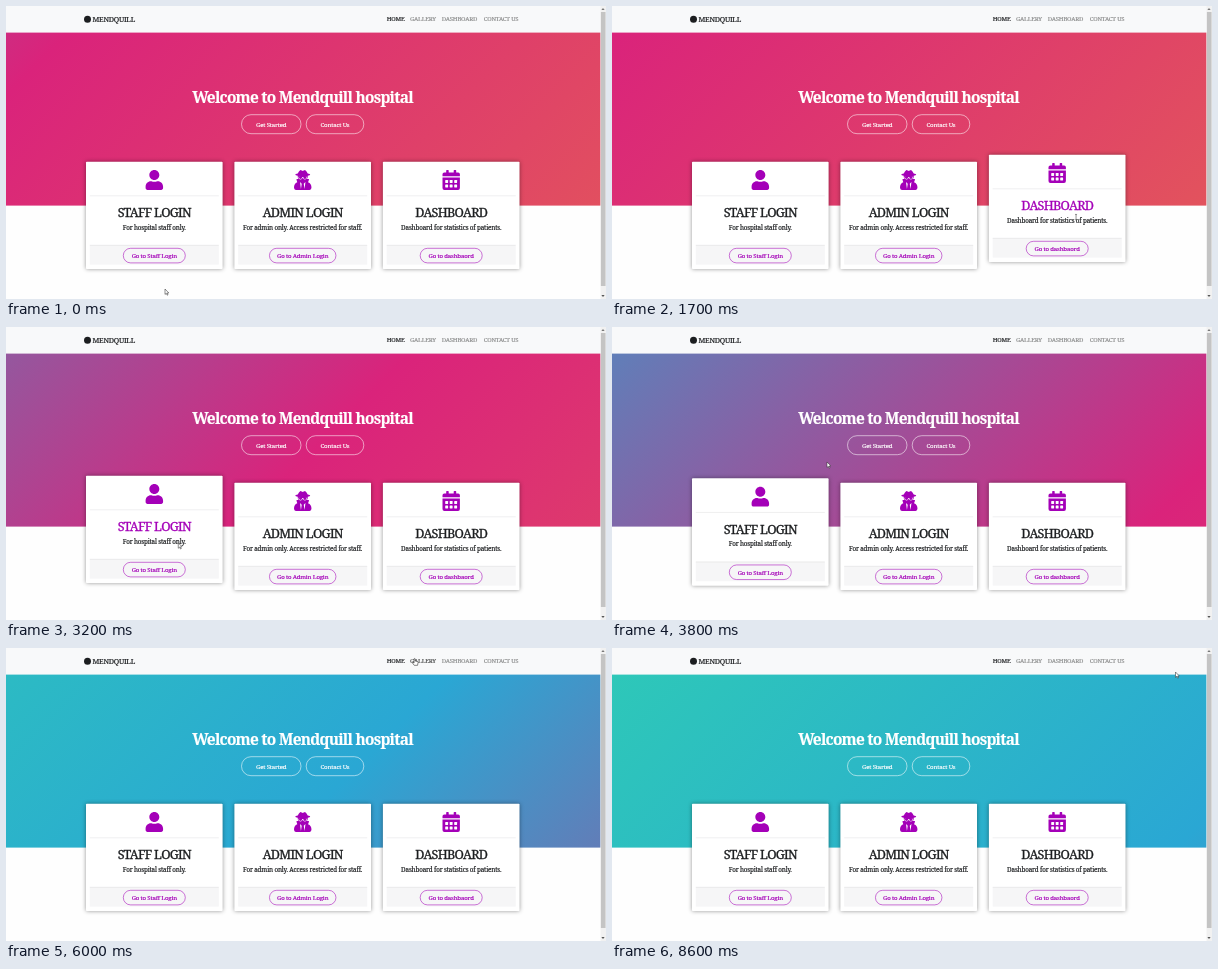
Write an HTML page that moves like this. It is 600 by 293 pixels and loops after 8.7 s.

```html
<!DOCTYPE html>
<html lang="en">
<head>
<meta charset="utf-8">
<title>Hospital home</title>
<style>
html, body { margin: 0; width: 100%; height: 100%; overflow: hidden; background: #fff; }
svg { display: block; width: 100vw; height: 100vh; }
text {
  font-family: "Noto Serif", serif; color: #1c1e20;
  fill: currentColor; stroke: currentColor; stroke-width: .18px;
}
.mid { text-anchor: middle; }
.brand { font-size: 7.3px; letter-spacing: -.25px; }
.link { font-size: 6px; letter-spacing: -.2px; color: #8c8d8d; }
.hero { font-size: 15.4px; font-weight: 700; letter-spacing: -.75px; color: #fff; }
.pill { font-size: 6.1px; letter-spacing: -.17px; }
.title { font-size: 12.6px; letter-spacing: -.7px; stroke-width: .3px; }
.note { font-size: 6.3px; letter-spacing: -.15px; }
.card { filter: drop-shadow(0 .5px 2px rgba(0, 0, 0, .42)); }
.icon { fill: #a400b8; }
</style>
</head>
<body>
<svg id="stage" viewBox="0 0 600 293" preserveAspectRatio="none">
  <defs>
    <linearGradient id="sky" gradientUnits="userSpaceOnUse" x1="1954" y1="1110" x2="422" y2="-422">
      <stop offset="0" stop-color="#e56353"/>
      <stop offset=".3333" stop-color="#da237b"/>
      <stop offset=".6667" stop-color="#2aa7d4"/>
      <stop offset="1" stop-color="#2fd4ae"/>
    </linearGradient>
  </defs>
  <rect width="600" height="293" fill="#fefefe"/>
  <rect width="595" height="27" fill="#f8f9fa"/>
  <rect y="26.6" width="594.6" height="173" fill="url(#sky)"/>
  <circle cx="81.5" cy="13.3" r="3.5" fill="#1c1e20"/>
  <text class="brand" x="86.5" y="16">MENDQUILL</text>
  <g id="nav"></g>
  <text class="hero mid" x="296.5" y="96.6">Welcome to Mendquill hospital</text>
  <g id="calls"></g>
  <g id="cards"></g>
  <rect x="594.6" width="5.4" height="293" fill="#f1f1f1"/>
  <rect x="594.9" y="6" width="4.6" height="274" fill="#c4c4c4"/>
  <path d="M595.4 4l1.6-2 1.6 2z" fill="#777"/>
  <path d="M595.4 289l1.6 2 1.6-2z" fill="#555"/>
  <g id="cursor">
    <path d="M0 0v5.4l1.3-1.1.9 1.9.8-.4-.9-1.8h1.7z" fill="#fff" stroke="#333" stroke-width=".55"/>
    <path d="M-1-2.7Q0-2.7 0-2Q0-2.7 1-2.7M0-2v4.4M-1 3Q0 3 0 2.4Q0 3 1 3" fill="none" stroke="#333" stroke-width=".55"/>
    <path d="M-.6-2.4q.6-.7 1.1 0v2.2l2.4.5q.6.2.5.9l-.5 2.9h-3.3l-1.9-2.5q0-.9.8-.5l.9.7z" fill="#fff" stroke="#333" stroke-width=".6"/>
  </g>
</svg>
<script>
const LOOP = 8700, LIFT = 7, INK = '#1c1e20', PURPLE = '#a400b8';
const SWEEP = 8000, TURN = 1850;
const $ = id => document.getElementById(id);

const user = `<path transform="translate(-8.7 164) scale(.039)" d="M224 256c70.7 0 128-57.3 128-128S294.7 0 224 0 96 57.3 96 128s57.3 128 128 128zm90 32h-17c-22 10-47 16-73 16s-51-6-73-16h-17C60 288 0 348 0 422v42c0 26 21 48 48 48h352c26 0 48-22 48-48v-42c0-74-60-134-134-134z"/>`;

const agent = `<g transform="translate(-8.7 164) scale(.039)">
  <path d="M32 116q0-18 64-28Q126 25 158 4q10-6 22 0l33 17q11 5 22 0l33-17q12-6 22 0 32 21 62 84 64 10 64 28 0 22-64 33v24q0 87-128 87T96 173v-24q-64-11-64-33z"/>
  <path d="M76 232h296q18 0 12 18l-24 64q88 30 88 134 0 64-48 64H48q-48 0-48-64 0-104 84-136l-20-62q-6-18 12-18z"/>
  <path fill="#fff" d="M116 170q108 20 216 0v28q-8 46-52 46-42 0-53-44h-6q-11 44-53 44-44 0-52-46z"/>
  <path d="M124 174h88q-6 56-44 56-40 0-44-56zM236 174h88q-4 56-44 56-38 0-44-56z"/>
  <path fill="#fff" d="M154 306l44 46-20 134zM294 306l-44 46 20 134z"/>
</g>`;

function calendar() {
  let dots = '';
  for (let i = 0; i < 6; i++)
    dots += `<rect x="${-6 + i % 3 * 4.5}" y="${174 + (i / 3 | 0) * 4.6}" width="2.9" height="2.9" rx=".4" fill="#fff"/>`;
  return `<path d="M-8.7 170.3v-2q0-1.8 1.8-1.8h1.9V164.6q0-.6.6-.6h1.3q.6 0 .6.6v1.9h5V164.6q0-.6.6-.6h1.3q.6 0 .6.6v1.9h1.9q1.8 0 1.8 1.8v2z"/>
    <path d="M-8.7 171.5H8.7V182q0 2-1.9 2H-6.8q-1.9 0-1.9-2z"/>` + dots;
}

const pill = (x, y, w, h, label, color, base) =>
  `<rect x="${x}" y="${y}" width="${w}" height="${h}" rx="${h / 2}" fill="none" stroke="${color}" stroke-width=".55"/>
   <text class="pill mid" x="${x + w / 2}" y="${base}" style="color:${color}">${label}</text>`;

// Each hover span is [start, end] in ms.
const cards = [
  { x: 148.3, icon: user, title: 'STAFF LOGIN', note: 'For hospital staff only.', go: 'Go to Staff Login', w: 62, hover: [[450, 760], [2590, 3730]] },
  { x: 296.7, icon: agent, title: 'ADMIN LOGIN', note: 'For admin only. Access restricted for staff.', go: 'Go to Admin Login', w: 66.5, hover: [[780, 1140], [2200, 2580]] },
  { x: 445.2, icon: calendar(), title: 'DASHBOARD', note: 'Dashboard for statistics of patients.', go: 'Go to dashbaord', w: 62, hover: [[1160, 2180]] }
];
const links = [
  { x: 380.7, label: 'HOME' },
  { x: 404, label: 'GALLERY', hover: [[5950, 6400]] },
  { x: 435.7, label: 'DASHBOARD', hover: [[6500, 7130]] },
  { x: 477.7, label: 'CONTACT US', hover: [[7150, 7600]] }
];

$('nav').innerHTML = links.map(l => `<text class="link" x="${l.x}" y="15.4">${l.label}</text>`).join('');
$('calls').innerHTML = pill(235.5, 108.7, 59.5, 19, 'Get Started', '#fff', 120.5) +
  pill(300.2, 108.7, 57.6, 19, 'Contact Us', '#fff', 120.5);
$('cards').innerHTML = cards.map(c => `<g transform="translate(${c.x} 0)"><g>
  <rect class="card" x="-68.3" y="155.7" width="136.6" height="107.3" rx=".8" fill="#fff"/>
  <g class="icon">${c.icon}</g>
  <path d="M-64.5 189.8h129" stroke="#e4e4e6" stroke-width=".6"/>
  <text class="title mid" y="211">${c.title}</text>
  <text class="note mid" y="223.6">${c.note}</text>
  <rect x="-64.5" y="239.3" width="129" height="19.3" fill="#f6f6f7"/>
  <path d="M-64.5 239.3h129" stroke="#dedee0" stroke-width=".6"/>
  ${pill(-c.w / 2, 242.3, c.w, 14.6, c.go, PURPLE, 252)}
</g></g>`).join('');

cards.forEach((c, i) => {
  c.body = $('cards').children[i].firstElementChild;
  c.head = c.body.querySelector('.title');
});
links.forEach((l, i) => l.el = $('nav').children[i]);

// Solves the CSS "ease" curve, cubic-bezier(.25, .1, .25, 1).
function ease(x) {
  if (x <= 0) return 0;
  if (x >= 1) return 1;
  let lo = 0, hi = 1, s;
  for (let i = 0; i < 24; i++) {
    s = (lo + hi) / 2;
    const at = .75 * s * (1 - s) + s ** 3;
    if (at < x) lo = s; else hi = s;
  }
  return .3 * s * (1 - s) ** 2 + 3 * s * s * (1 - s) + s ** 3;
}

const inside = (spans, t) => !!spans && spans.some(([a, b]) => t >= a && t < b);
const raised = (spans, t) => Math.max(...spans.map(([a, b]) => ease((t - a) / 300) - ease((t - b) / 300)));

// Pointer stops: time, x, y.
const stops = [
  [0, 159, 283], [250, 159, 283], [500, 185, 245], [800, 240, 228], [1160, 378, 218],
  [1450, 462, 211], [1850, 465, 211], [2180, 372, 226], [2600, 186, 251.5], [2700, 184, 252],
  [3250, 172, 215], [3800, 215, 135], [4200, 262, 13], [4480, 330, 34], [5000, 390, 79],
  [5300, 392, 56], [5650, 389, 14], [6150, 414, 13], [6700, 450, 13], [7100, 475, 14],
  [7500, 500, 13], [7900, 590, 22], [8200, 576, 14], [8600, 563.5, 24]
];

function pointer(t) {
  const i = stops.findIndex(s => s[0] > t);
  if (i < 0) return stops[stops.length - 1].slice(1);
  const [a, ax, ay] = stops[i - 1], [b, bx, by] = stops[i];
  let k = (t - a) / (b - a);
  k = k * k * (3 - 2 * k);
  return [ax + (bx - ax) * k, ay + (by - ay) * k];
}

const shapes = [...$('cursor').children];

function draw(t) {
  const swing = t < TURN ? ease((t - TURN) / SWEEP + 1) : 1 - ease((t - TURN) / SWEEP);
  $('sky').setAttribute('gradientTransform', `translate(${-1782 * swing} -231)`);
  for (const c of cards) {
    c.body.setAttribute('transform', `translate(0 ${-LIFT * raised(c.hover, t)})`);
    c.head.style.color = inside(c.hover, t) ? PURPLE : INK;
  }
  let hand = false;
  links.forEach((l, i) => {
    const on = inside(l.hover, t);
    hand = hand || on;
    l.el.style.color = !i ? INK : on ? '#4c4d4d' : '';
  });
  const [x, y] = pointer(t);
  $('cursor').setAttribute('transform', `translate(${x} ${y})`);
  const kind = hand ? 2 : t > 1400 && t < 1920 ? 1 : 0;
  shapes.forEach((s, i) => s.style.display = i === kind ? '' : 'none');
}

const start = performance.now();
function tick() {
  draw((performance.now() - start) % LOOP);
  requestAnimationFrame(tick);
}
draw(0);
requestAnimationFrame(tick);
</script>
</body>
</html>
```
